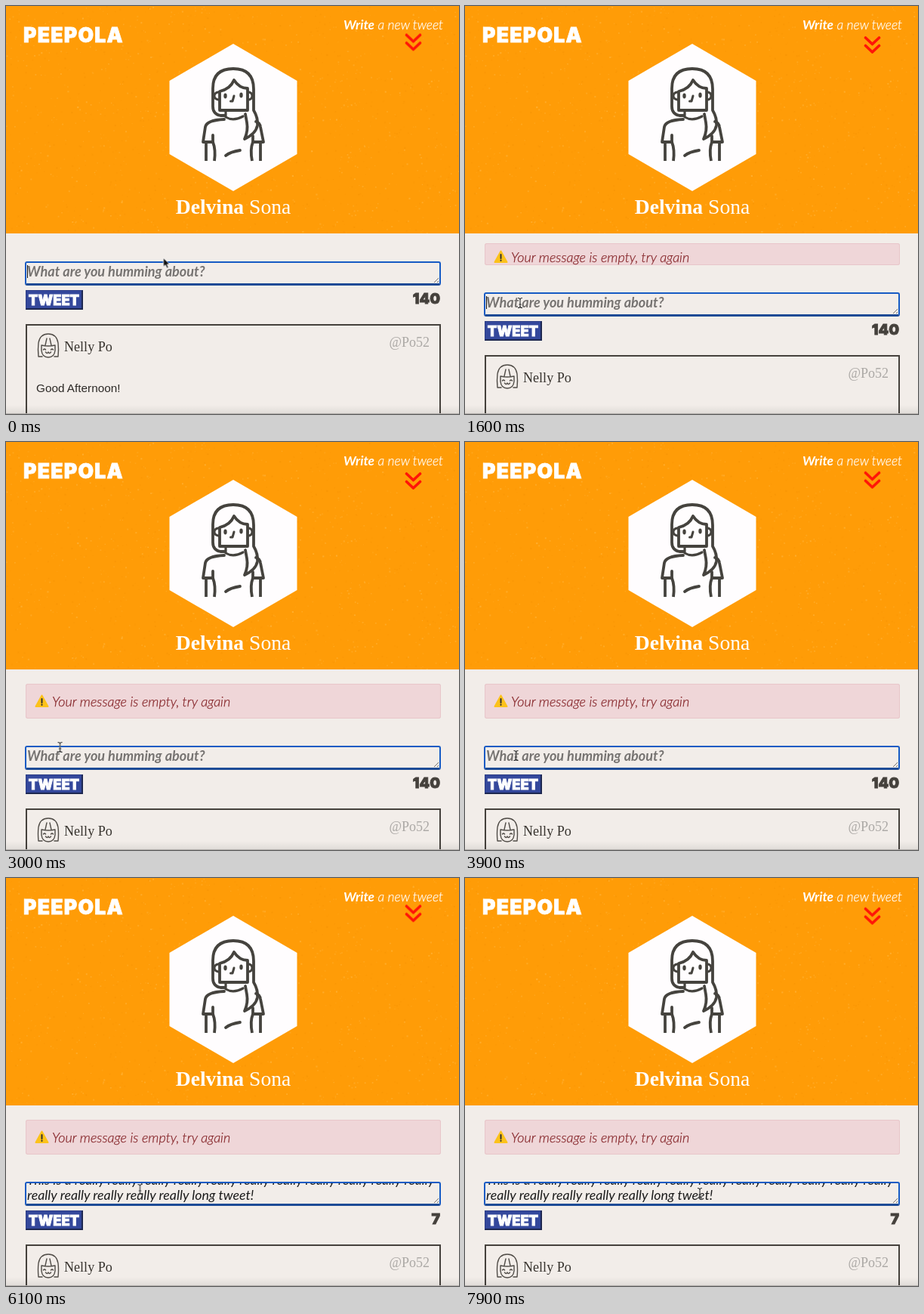
An HTML page with a canvas that plays this animation: 600 by 540 pixels, repeating every 8000 ms.

```html
<!DOCTYPE html>
<html lang="en">
<head>
<meta charset="utf-8">
<title>Peepola</title>
<style>
  :root { --loop: 8s; --ink: #45413c; }
  html, body { margin: 0; width: 100%; height: 100%; overflow: hidden; }
  body { background: #f2ede9; }
  .stage { position: relative; width: 600px; height: 540px; overflow: hidden; background: #f2ede9; }
  .stage * { box-sizing: border-box; }
  .abs, .stage svg { position: absolute; white-space: nowrap; }

  header { position: absolute; inset: 0 0 auto; height: 301px; overflow: hidden; background: #ff9c07; color: #fff; }
  header canvas, header svg { position: absolute; left: 0; top: 0; }
  .block { font-family: Inter, "Noto Sans", sans-serif; font-weight: 900; -webkit-text-stroke: .8px currentColor; }
  .logo { left: 23px; top: 23px; font-size: 26.5px; line-height: 31px; letter-spacing: 1.3px; }
  .slant { font-family: Lato, "Open Sans", sans-serif; font-style: italic; }
  .light { font-weight: 300; -webkit-text-stroke: .25px currentColor; }
  .write { right: 21px; top: 14px; font-size: 17.4px; line-height: 22px; }
  .write b { font-weight: 700; -webkit-text-stroke: 0; }
  .serif { font-family: "Liberation Serif", Times, serif; }
  .owner { left: 1px; width: 600px; top: 250px; text-align: center; font-size: 27.6px; line-height: 32px; }

  .chevrons { animation: bounce 2s -.57s infinite; }
  @keyframes bounce {
    0%, 20%, 50%, 80%, 100% { transform: none; }
    40% { transform: translateY(-5px); }
    60% { transform: translateY(-3px); }
  }

  main { position: absolute; top: 302px; left: 0; width: 600px; height: 238px; display: flow-root; overflow: hidden; }
  .alert {
    position: relative; margin-left: 26px; width: 550px; overflow: hidden; border-radius: 3px;
    background: #efd6d8; box-shadow: inset 0 0 0 1px #e8c6ca; color: #86262a;
    animation: open var(--loop) infinite;
  }
  .message { left: 0; height: 22px; font-size: 18px; line-height: 22px;
    padding-left: 35px; animation: pad var(--loop) infinite; }
  .message svg { left: 12px; top: 2px; }
  @keyframes open {
    0%, 17.05% { margin-top: 0; height: 0; animation-timing-function: cubic-bezier(.37, 0, .63, 1); }
    22.05%, 100% { margin-top: 18px; height: 46px; }
  }
  @keyframes pad {
    0%, 17.05% { top: 0; animation-timing-function: cubic-bezier(.37, 0, .63, 1); }
    22.05%, 100% { top: 12px; }
  }

  .form { position: relative; height: 400px; }
  .field { left: 25px; top: 36px; width: 551px; height: 32px; overflow: hidden; border: 2px solid #165bc4;
    border-bottom: 3px solid #1d4b96; border-radius: 3px; }
  .field .slant { left: 1px; }
  .hint { top: 0; font-size: 18.1px; line-height: 22px; font-weight: 700; color: #767371; }
  .typed { top: -13.8px; font-size: 17.8px; line-height: 19.5px; color: #1c1c1c; }
  .field svg { right: 0; bottom: 0; }
  .caret { width: 1px; height: 17px; background: #111; animation: blink var(--loop) step-end infinite; }
  .hint .caret { left: 0; top: 3px; }
  .typed .caret { margin: 2px 0 0 1px; }
  @keyframes blink {
    0%, 12.5%, 29.55%, 42.05%, 55%, 67.5%, 80%, 92.5% { opacity: 1; }
    6.25%, 23.3%, 35.8%, 48.3%, 61.25%, 73.75%, 86.25%, 98.75%, 100% { opacity: 0; }
  }

  .before { --first: 1; --then: 0; }
  .after { --first: 0; --then: 1; }
  .before, .after { animation: paste var(--loop) step-end infinite; }
  @keyframes paste {
    0% { opacity: var(--first); }
    55%, 100% { opacity: var(--then); }
  }

  .button { left: 26px; top: 74px; width: 76px; height: 26px; background: #34489c; color: #fff;
    border: 1px solid #27356f; border-width: 1px 2px 2px 1px; border-color: #2c3d85 #1d2750 #1d2750 #2c3d85;
    text-align: center; font-size: 18.3px; line-height: 24px; }
  .count { right: 25px; top: 73px; font-size: 19.4px; line-height: 25px; color: var(--ink); }

  .card { left: 26px; top: 119px; width: 550px; height: 300px; border: 2px solid var(--ink); }
  .face { left: 13px; top: 9px; }
  .author { left: 49px; top: 17px; font-size: 18.1px; line-height: 22px; color: #38342f; }
  .handle { right: 13px; top: 11px; font-size: 18px; line-height: 22px; color: #aba8a5; }
  .body { left: 12px; top: 73px; font: 15.3px/20px "Liberation Sans", Arial, sans-serif; color: #2c2926; }
  .edge { left: 0; bottom: 0; width: 600px; height: 12px; border-bottom: 1px solid #b4b0ad;
    background: linear-gradient(transparent, rgba(0, 0, 0, .07)); }

  .pointer { left: 0; top: 0; animation: travel var(--loop) ease-in-out infinite; }
  .pointer svg { overflow: visible; left: 0; top: 0; animation: shape var(--loop) step-end infinite; }
  .arrow { --arrow: 1; --beam: 0; }
  .beam { --arrow: 0; --beam: 1; }
  @keyframes travel {
    0%, 5% { transform: translate(208.5px, 333.5px); }
    12.5%, 17% { transform: translate(68px, 390px); }
    20% { transform: translate(73px, 393px); }
    26.25%, 31% { transform: translate(93px, 345px); }
    40%, 56% { transform: translate(67.5px, 415px); }
    63%, 80% { transform: translate(177.5px, 412px); }
    90%, 100% { transform: translate(311px, 417px); }
  }
  @keyframes shape {
    0%, 10.5%, 21%, 33.5% { opacity: var(--arrow); }
    6.5%, 19%, 24%, 37%, 100% { opacity: var(--beam); }
  }
</style>
</head>
<body>
<div class="stage">
  <header>
    <canvas id="grain" width="600" height="302"></canvas>
    <svg width="600" height="302" fill="none" stroke-linecap="round" stroke-linejoin="round">
      <path d="M301 50 385.5 99V196L301 245 216.5 196V99Z" fill="#fffdfe"/>
      <g stroke="#45433e" stroke-width="3.8">
        <path d="M290 145H284Q274 143 274 133V109Q274 83 301 83T328 110V138Q334 148 333 158 331 169 316 176 321 165 319 154L317 143"/>
        <path d="M283 138V113Q297 110 302 98 309 109 320 109V138Z"/>
        <path d="M281 114Q276 115 276 119T281 124M322 114Q326 115 326 119T322 124" stroke-width="3"/>
        <path d="M291 140V147Q301 153 314 146" stroke-width="3.2"/>
        <path d="M289 150Q266 151 264 160L261 180H274V171M331 153Q336 154 337 160L341 180H327V172"/>
        <path d="M265 182V205M274 180Q278 190 276 205M337 182V205M327 180Q323 190 326 205" stroke-linecap="butt"/>
        <path d="M291 198Q297 193 310 191"/>
        <path d="M302 119 300 126H297.5" stroke-width="3"/>
      </g>
      <g fill="#45433e">
        <ellipse cx="290.5" cy="119" rx="2.2" ry="3.4"/>
        <ellipse cx="311.5" cy="118" rx="2.2" ry="3.4"/>
      </g>
      <path class="chevrons" d="M530.5 42 539.5 50.5 548.5 42M530.5 52.5 539.5 61 548.5 52.5" stroke="#ff1408" stroke-width="3.6"/>
    </svg>
    <div class="abs block logo">PEEPOLA</div>
    <div class="abs slant light write"><b>Write</b> a new tweet</div>
    <div class="abs serif owner"><b>Delvina</b> Sona</div>
  </header>

  <main>
    <div class="alert">
      <div class="abs slant light message">
        <svg width="19" height="18" stroke-linecap="round" stroke-linejoin="round" stroke-width="2">
          <path d="M9.5 1.5 17.5 16H1.5Z" fill="#fcc21b" stroke="#fcc21b"/>
          <path d="M9.5 6V11M9.5 13.5V14" stroke="#2f2f2f"/>
        </svg>
        Your message is empty, try again
      </div>
    </div>
    <div class="form">
      <div class="abs field">
        <div class="abs slant hint before">What are you humming about?<i class="abs caret"></i></div>
        <div class="abs slant typed after">
          <div id="longLine"></div>
          <div>really really really really really long tweet!<i class="abs caret"></i></div>
        </div>
        <svg width="8" height="8" stroke="#77736f"><path d="M1 7 7 1M5 7 7 5"/></svg>
      </div>
      <div class="abs block button">TWEET</div>
      <div class="abs block count before">140</div>
      <div class="abs block count after">7</div>
      <div class="abs card">
        <svg class="face" width="32" height="36" fill="none" stroke="#504c47" stroke-width="1.4" stroke-linecap="round" stroke-linejoin="round">
          <path d="M7 32H2Q1 22 2 14 4 2 15 2T28 14Q29 22 28 32H23"/>
          <path d="M6 17V24Q7 33 15 33T24 24V17Q15 19 6 17M11 17 13 8M19 17 17 8"/>
          <path d="M8.5 23Q10 21 11.5 23M18.5 23Q20 21 21.5 23M11.5 26Q13.5 29 15 26 16.5 29 18.5 26"/>
        </svg>
        <div class="abs serif author">Nelly Po</div>
        <div class="abs serif handle">@Po52</div>
        <div class="abs body">Good Afternoon!</div>
      </div>
    </div>
  </main>
  <div class="abs edge"></div>

  <div class="abs pointer">
    <svg class="arrow" width="1" height="1"><path d="M0 0V11.5L2.7 9.2 4.7 13.5 6.7 12.6 4.8 8.4H8.3Z" fill="#111" stroke="#fff" stroke-width=".8"/></svg>
    <svg class="beam" width="1" height="1" fill="none">
      <defs><path id="beam" d="M-3-6.5Q0-6.5 0-4.5 0-6.5 3-6.5M0-4.5V4.5M-3 6.5Q0 6.5 0 4.5 0 6.5 3 6.5M-1.5 2H1.5"/></defs>
      <use href="#beam" stroke="#fff" stroke-width="2.2" opacity=".6"/>
      <use href="#beam" stroke="#222" stroke-width="1.1"/>
    </svg>
  </div>
</div>
<script>
  document.getElementById('longLine').textContent = 'This is a ' + 'really '.repeat(11);

  // Faint paper grain on the header
  const grain = document.getElementById('grain').getContext('2d');
  let seed = 37;
  const random = () => (seed = seed * 16807 % 2147483647) / 2147483647;
  for (let i = 0; i < 1600; i++) {
    const size = .8 + random() * 1.4;
    grain.fillStyle = random() < .6
      ? `rgba(255, 200, 100, ${.1 + random() * .3})`
      : `rgba(235, 140, 0, ${.1 + random() * .2})`;
    grain.fillRect(random() * 600, random() * 302, size, size);
  }
</script>
</body>
</html>
```
